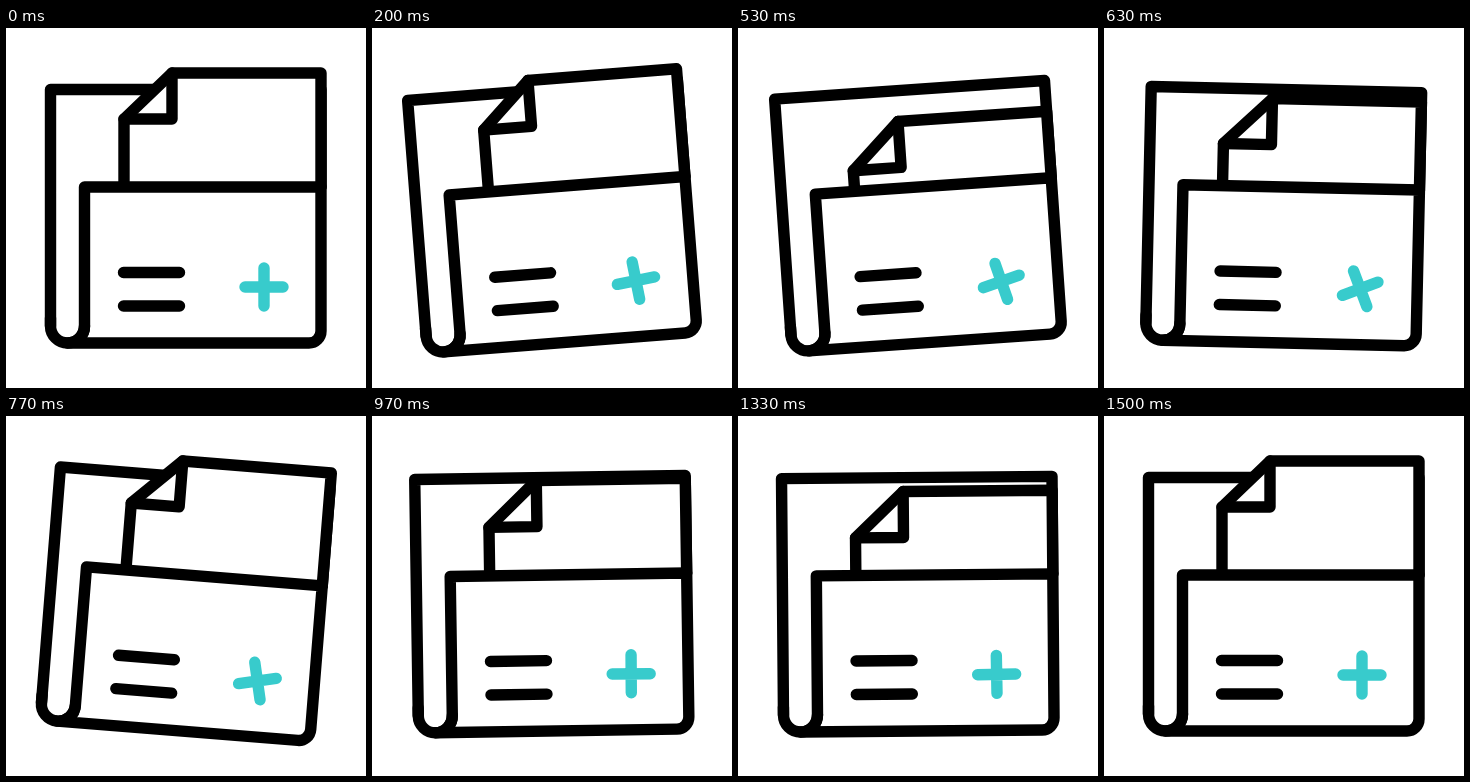
An HTML page with a canvas that plays this animation: 360x360 px, repeating every 1670 ms.

```html
<!DOCTYPE html>
<html lang="en">
<head>
<meta charset="utf-8">
<title>Folder</title>
<style>
  html, body { margin: 0; width: 100%; height: 100%; overflow: hidden; background: #fff; }
  canvas { display: block; width: 100vmin; height: 100vmin; }
</style>
</head>
<body>
<canvas id="stage" width="360" height="360"></canvas>
<script>
const ctx = document.getElementById('stage').getContext('2d');
const LOOP = 1670;
const FPS = 30;
const INK = '#000';
const ACCENT = '#38cbcc';

// Each track is a list of [time in ms, value], eased between neighbours.
const tilt = [[70, 0], [348, -10], [765, 4.6], [1050, -2.2], [1460, 0]];
const paperDrop = [[120, 0], [480, 51], [790, 0], [1207, 51], [1495, 0]];
const plusTurn = [[122, 0], [610, -112], [960, -89.5], [1170, -91.3], [1470, -90]];

const back = new Path2D('M44.5 298 V61.5 H315 V303 L61 315 Z');
const backEdge = new Path2D('M44.5 298 V61.5 H315 V159');
const front = new Path2D(
  'M78.5 159 H315 V303 A12 12 0 0 1 303 315 H61.5 A17 17 0 0 0 78.5 298 Z');
const spine = new Path2D('M44.5 290 V298 A17 17 0 0 0 78.5 298');
const textLines = new Path2D('M117.5 244.5 H173.5 M117.5 278 H173.5');
const plus = new Path2D('M-19 0 H19 M0 -19 V19');

const radians = degrees => degrees * Math.PI / 180;

function valueAt(track, t) {
  if (t <= track[0][0]) return track[0][1];
  for (let i = 1; i < track.length; i++) {
    const [t0, v0] = track[i - 1];
    const [t1, v1] = track[i];
    if (t < t1) {
      const eased = (1 - Math.cos(Math.PI * (t - t0) / (t1 - t0))) / 2;
      return v0 + (v1 - v0) * eased;
    }
  }
  return track[track.length - 1][1];
}

function drawShape(path, color = INK, fill = true) {
  if (fill) {
    ctx.fillStyle = '#fff';
    ctx.fill(path);
  }
  ctx.strokeStyle = color;
  ctx.stroke(path);
}

function drawPaper(drop) {
  const top = 45 + drop;
  const fold = 91 + drop;
  drawShape(new Path2D(`M118 159 V${fold} L166 ${top} H315 V159`));
  drawShape(new Path2D(`M118 ${fold} H166 V${top}`), INK, false);
}

function draw(t) {
  ctx.setTransform(1, 0, 0, 1, 0, 0);
  ctx.fillStyle = '#fff';
  ctx.fillRect(0, 0, 360, 360);
  ctx.lineWidth = 11.4;
  ctx.lineCap = ctx.lineJoin = 'round';

  ctx.translate(180, 180);
  ctx.rotate(radians(valueAt(tilt, t)));
  ctx.translate(-180, -180);

  ctx.fill(back);
  drawShape(backEdge, INK, false);
  drawPaper(valueAt(paperDrop, t));
  drawShape(front);
  drawShape(spine, INK, false);
  drawShape(textLines, INK, false);

  ctx.translate(258, 259);
  ctx.rotate(radians(valueAt(plusTurn, t)));
  drawShape(plus, ACCENT, false);
}

function tick() {
  const t = performance.now() % LOOP;
  // Motion advances in whole steps; the small offset absorbs 10 ms rounding.
  draw(Math.floor((t + 4) * FPS / 1000) * 1000 / FPS);
  requestAnimationFrame(tick);
}
tick();
</script>
</body>
</html>
```
